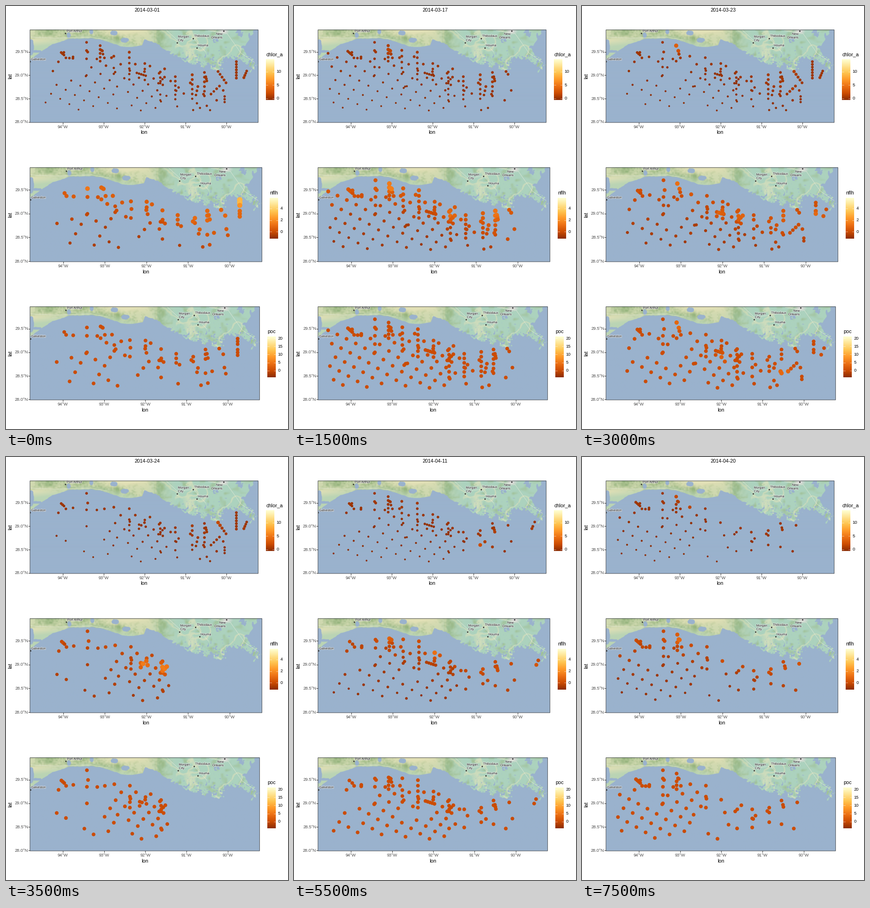
These frames come from a looping animation (600x900 px, 8000 ms). A matplotlib script:

```python
import numpy as np
import matplotlib.pyplot as plt
from matplotlib.animation import FuncAnimation
from matplotlib.colors import LinearSegmentedColormap
from matplotlib.patches import Rectangle
from matplotlib.path import Path
from matplotlib.patheffects import withStroke

W, H, PX = 600, 900, 0.72
MAP_X, MAP_Y, MAP_W, MAP_H = 50.5, 50.5, 486, 197
plt.rcParams["font.family"] = "Liberation Sans"
CMAP = LinearSegmentedColormap.from_list("ylorbr", [
    "#8C2D04", "#CC4C02", "#EC7014", "#FE9929", "#FEC44F", "#FEE391", "#FFFFD4"])

# Survey transects: x0, y0, x1, y1, number of stations
TRANSECTS = [(114, 96, 123, 104, 4), (127, 110, 142, 111, 3),
             (171, 77, 171, 147, 5), (200, 84, 200, 117, 5),
             (203, 94, 209, 110, 3), (229, 94, 229, 144, 5),
             (233, 174, 236, 171, 2), (262, 98, 262, 156, 6),
             (278, 142, 297, 148, 5), (295, 122, 295, 157, 4),
             (328, 128, 328, 200, 7), (324, 164, 337, 151, 4),
             (360, 150, 360, 198, 6), (362, 180, 367, 173, 2),
             (396, 146, 396, 197, 6), (404, 189, 408, 171, 3),
             (422, 141, 422, 191, 6), (425, 150, 427, 159, 3),
             (436, 187, 454, 170, 4), (451, 139, 468, 163, 5),
             (465, 192, 465, 204, 3), (490, 118, 490, 153, 7),
             (506, 152, 512, 138, 4), (398, 221, 427, 212, 3)]


def shoreline(x):
    return np.interp(x, [51, 171, 262, 330, 420, 512], [85, 70, 85, 110, 150, 150])


def stations():
    lines = np.vstack([np.linspace((x0, y0), (x1, y1), n)
                       for x0, y0, x1, y1, n in TRANSECTS])
    # single stations, spread evenly over the open shelf
    x = np.r_[np.arange(72, 345, 3.9), np.arange(350, 470, 14)]
    spread = np.arange(len(x)) * .618 % 1
    top = shoreline(x) + 18
    return np.vstack([lines, np.c_[x, top + spread * (223 - top)]]).T


SX, SY = stations()
depth = np.clip(SY - shoreline(SX), 0, None)
jitter, rank, rank2 = np.random.default_rng(4).uniform(0, 1, (3, len(SX)))
jitter = 2 * jitter - 1

# cover: share of stations seen at KNOTS; part, east: limits for nflh and poc;
# far, near: nflh level off and at the shore; the rest: blooms (x, y, strength)
KNOTS = [90, 190, 290, 400, 490]
DAYS = [
    dict(cover=(.75, .9, .9, 1, 1), part=.5, far=.08, near=.2,
         nflh=[(171, 77, .8), (490, 121, .36), (409, 148, .13)]),
    dict(cover=(1, 1, .95, 1, 0), far=.05, near=.18,
         chl=[(204, 93, .08)], nflh=[(207, 88, .24), (328, 150, .16), (424, 146, .16)]),
    dict(cover=(.75, 1, .95, 1, .95), far=.05, near=.17,
         chl=[(203, 94, .14), (440, 170, .15)],
         nflh=[(229, 116, .12), (425, 150, .18), (490, 150, .22)],
         poc=[(203, 92, .2), (297, 160, .2), (428, 188, .38)]),
    dict(cover=(.4, .45, .7, .9, 1), east=345, far=.08, near=.08,
         chl=[(200, 84, .35), (452, 139, .1)],
         nflh=[(200, 87, .3), (290, 147, .26), (331, 154, .28)], poc=[(200, 84, .13)]),
    dict(cover=(1, 1, 1, 1, 1), east=357, far=.03, near=.16,
         chl=[(91, 101, .2), (115, 95, .18)],
         nflh=[(129, 113, .26), (262, 148, .18), (328, 126, .6)]),
    dict(cover=(.6, .9, .95, .5, .3), part=.85, far=.025, near=.14,
         chl=[(422, 174, .26), (396, 186, .14)],
         nflh=[(200, 84, .18), (295, 122, .18), (490, 144, .38)],
         poc=[(95, 142, .08)]),
    dict(cover=(.9, .9, .2, .45, 0), far=.025, near=.14,
         chl=[(229, 94, .22), (200, 84, .1)],
         nflh=[(204, 92, .14), (295, 124, .2), (466, 158, .28)]),
]
KEYS = [0, 3, 5, 7, 9, 11, 15]
DATES = ("03-01 03-03 03-08 03-17 03-18 03-19 03-23 03-24 "
         "04-08 04-09 04-10 04-11 04-12 04-16 04-19 04-20").split()


def glow(spots):
    out = np.zeros(len(SX))
    for x, y, a in spots:
        out = np.maximum(out, a * np.exp(-((SX - x) ** 2 + (SY - y) ** 2) / 140))
    return out


def day_state(day):
    """Visibility and scaled value of every station for the three variables."""
    seen = rank < np.interp(SX, KNOTS, day["cover"])
    seen2 = seen & (rank2 < day.get("part", 1)) & (SX < day.get("east", W))
    chl = .05 * np.exp(-(depth / 58) ** 2) * (1 + .3 * jitter)
    nflh = day["far"] + day["near"] * np.exp(-(depth / 65) ** 2) + .02 * jitter
    poc = .165 + .008 * jitter
    value = [v + glow(day.get(k, [])) for k, v in
             (("chl", chl), ("nflh", nflh), ("poc", poc))]
    return np.array([seen, seen2, seen2]), np.clip(value, 0, 1)


STATES = [day_state(d) for d in DAYS]


def frame_state(i):
    pos = np.interp(i, KEYS, np.arange(len(KEYS)))
    a = int(pos)
    b, mix = min(a + 1, len(KEYS) - 1), pos - a
    later = np.random.default_rng(100 + i).random(len(SX)) < mix
    seen = np.where(later, STATES[b][0], STATES[a][0])
    return seen, (1 - mix) * STATES[a][1] + mix * STATES[b][1]


COAST = [(40, 40), (40, 122), (75, 97), (98, 82), (135, 70), (182, 69), (205, 73),
         (245, 86), (266, 88), (289, 84), (294, 71), (320, 80), (342, 96),
         (372, 112), (396, 124), (436, 129), (452, 138), (464, 122), (460, 108),
         (494, 114), (516, 125), (521, 138), (532, 128), (518, 110), (500, 88),
         (512, 76), (528, 40)]
LAKES = [(53, 88, 6, 17), (66, 97, 9, 3), (133, 63, 4, 6), (181, 55, 4, 6),
         (229, 58, 8, 5), (252, 73, 9, 5), (447, 73, 5, 4), (497, 58, 8, 5)]


def terrain():
    rng = np.random.default_rng(11)
    w, h = MAP_W * 2, MAP_H * 2

    def noise(cell):
        nx, ny = int(MAP_W / cell) + 2, int(MAP_H / cell) + 2
        gx, gy = np.linspace(0, nx - 1, w), np.linspace(0, ny - 1, h)
        grid = rng.random((ny, nx))
        rows = np.array([np.interp(gx, np.arange(nx), r) for r in grid])
        return np.array([np.interp(gy, np.arange(ny), c) for c in rows.T]).T

    def blend(a, b, t):
        return a + (np.array(b) - a) * np.clip(t, 0, 1)[..., None]

    x, y = np.meshgrid(MAP_X + (np.arange(w) + .5) / 2, MAP_Y + (np.arange(h) + .5) / 2)
    east = np.clip((x - 300) / 60, 0, 1)
    rough = 1.5 + 10 * east
    wx, wy = x + rough * (noise(4) - .5), y + rough * (noise(4) - .5)
    land = Path(COAST).contains_points(np.c_[wx.ravel(), wy.ravel()]).reshape(h, w)
    for cx, cy, rx, ry in LAKES:
        land &= ((wx - cx) / rx) ** 2 + ((wy - cy) / ry) ** 2 > 1
    marsh = np.clip((y - 75) / 50, 0, 1) * east
    land &= noise(2.5) < 1 - .36 * marsh

    big, mid, fine = noise(24), noise(9), noise(3)
    flat = np.ones((h, w, 3))
    west = blend(flat * (208, 217, 176), (150, 180, 126),
                 2.4 * (.5 * big + .35 * mid + .3 * fine - .42))
    west = blend(west, (226, 224, 182), (1 - np.abs(x - 255) / 75) * (68 - y) / 10)
    west = blend(west, (186, 212, 180), (y - shoreline(x) + 12) / 16)
    teal = blend(flat * (172, 210, 190), (160, 192, 150), 3 * (mid - .62))
    levee = 1 - np.abs(big + .3 * mid - .68) / .07
    teal = blend(teal, (214, 223, 188), levee * .9)
    rgb = west + (teal - west) * east[..., None]
    rgb = blend(rgb, (216, 217, 214), 1.4 - np.hypot((x - 462) / 10, (y - 54) / 6))
    return np.where(land[..., None], rgb, flat * (154, 178, 205)) / 255


fig = plt.figure(figsize=(W / 100, H / 100), dpi=100, facecolor="white")
ax = fig.add_axes([0, 0, 1, 1])
ax.axis("off")


def text(x, y, s, size=9, color="black", **kw):
    kw.setdefault("va", "center")
    return ax.text(x, y, s, fontsize=size * PX, color=color, **kw)


def line(x, y, color, lw, **kw):
    return ax.plot(x, y, color=color, lw=lw * PX, **kw)[0]


# dot x, dot y, label dx, dy, label, alignment
CITIES = [(126, 58, 2.5, -4.5, "Port Arthur", "left"),
          (364, 78, 1.5, -8.7, "Morgan\nCity", "left"),
          (397.5, 68.5, 2.5, -4.5, "Thibodaux", "left"),
          (406, 88.5, 2, -4.5, "Houma", "left"),
          (462.5, 52.5, -2, 11, "New\nOrleans", "right"),
          (51, 118, 2, -4.5, "Galveston", "left")]
ROADS = [[(51, 66), (105, 68), (180, 66), (215, 72)],
         [(340, 50), (366, 74), (398, 68), (425, 98)],
         [(430, 52), (470, 58), (500, 100), (528, 119)]]
HALO = [withStroke(linewidth=1.2, foreground="#ffffffb0")]


class Panel:
    def __init__(self, box, land, name, bar, step, top):
        self.x0, self.y0, x1, y1 = box
        self.kx, self.ky = (x1 - self.x0) / MAP_W, (y1 - self.y0) / MAP_H
        frame = Rectangle((self.x0, self.y0), x1 - self.x0, y1 - self.y0,
                          fill=False, ec="#4a4e54", lw=PX, zorder=6, snap=False)
        ax.add_patch(frame)
        ax.imshow(land, extent=(self.x0, x1, y1, self.y0), aspect="auto",
                  interpolation="bilinear", zorder=1)
        for road in ROADS:
            line(*self.at(*np.array(road, float).T), "#eeeedd", .8, alpha=.7, zorder=2)
        for x, y, dx, dy, city, ha in CITIES:
            px, py = self.at(x, y)
            dot = line([px], [py], "#3a3a3a", 1, marker="o", ms=3 * PX, mew=0, zorder=3)
            label = text(px + dx, py + dy, city, 6.9, "#222222", ha=ha, zorder=3,
                         linespacing=1.1, path_effects=HALO)
            for item in (dot, label):
                item.set_clip_path(frame)
        self.dots = ax.scatter([], [], linewidths=0, zorder=4)
        self.axes(x1, y1)
        self.legend(name, bar, step, top)

    def at(self, x, y):
        return self.x0 + (x - MAP_X) * self.kx, self.y0 + (y - MAP_Y) * self.ky

    def axes(self, x1, y1):
        for i in range(5):
            x = self.at(120.3 + 87.15 * i, 0)[0]
            line([x, x], [y1, y1 + 2.7], "#333333", 1)
            text(x, y1 + 9.7, f"{94 - i}°W", 9.1, "#4d4d4d", ha="center")
        for i in range(4):
            y = self.at(0, 97.2 + 49.77 * i)[1]
            line([self.x0 - 2.7, self.x0], [y, y], "#333333", 1)
            text(47.3, y, f"{29.5 - i / 2}°N", 9.3, "#4d4d4d", ha="right")
        text((self.x0 + x1) / 2, y1 + 21.5, "lon", 10.8, ha="center")
        text(9.5, (self.y0 + y1) / 2, "lat", 10.8, ha="center", rotation=90)

    def legend(self, name, bar, step, top):
        x, y, low, high = bar
        text(x, y - 10.5, name, 10.8)
        ax.imshow(np.linspace(1, 0, 200)[:, None], cmap=CMAP, vmin=0, vmax=1,
                  extent=(x, x + 17.3, y + 86.4, y), aspect="auto", zorder=1)
        for value in range(0, top + 1, step):
            ty = y + 86.4 * (high - value) / (high - low)
            for a in (x, x + 13.8):
                line([a, a + 3.5], [ty, ty], "white", .5, zorder=2)
            text(x + 22.5, ty, str(value), 9.1)

    def show(self, seen, value):
        v = value[seen]
        self.dots.set_offsets(np.c_[self.at(SX[seen], SY[seen])])
        self.dots.set_sizes((2 * (1.8 + 5.2 * np.sqrt(v)) * PX) ** 2)
        self.dots.set_facecolors(CMAP(v))


land = terrain()
panels = [
    Panel((51, 50.8, 536.6, 247.9), land, "chlor_a", (553, 113.7, -.6, 14.6), 5, 10),
    Panel((51, 343.8, 544.6, 544.1), land, "nflh", (561, 408.7, -1.2, 5.8), 2, 4),
    Panel((51, 639.8, 539.6, 838.1), land, "poc", (556, 703.7, -4.2, 21), 5, 20),
]
title = text(300, 8.5, "", 10.6, ha="center")
ax.set_xlim(0, W)
ax.set_ylim(H, 0)


def update(i):
    title.set_text("2014-" + DATES[i])
    for panel, seen, value in zip(panels, *frame_state(i)):
        panel.show(seen, value)
    return [title] + [p.dots for p in panels]


anim = FuncAnimation(fig, update, frames=len(DATES), interval=500,
                     repeat=True, repeat_delay=0, blit=False)
plt.show()
```
